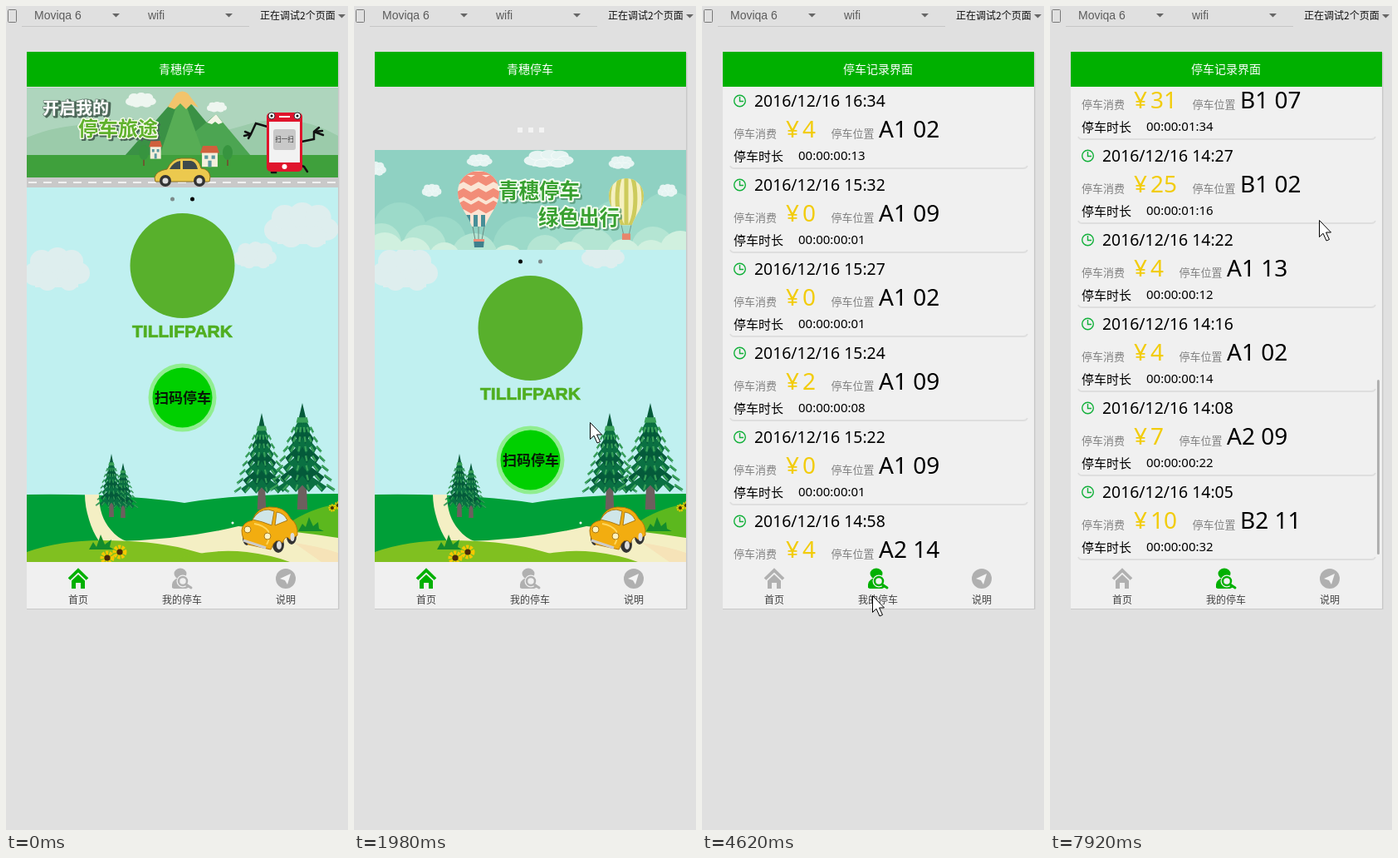
Animation of 412 by 990 pixels, one loop 8000 ms. Source, as an HTML page:

```html
<!DOCTYPE html>
<html lang="zh">
<head>
<meta charset="utf-8">
<title>停车</title>
<style>
html, body { margin: 0; width: 100%; height: 100%; overflow: hidden; background: #e0e0e0; }
svg { display: block; width: 412px; height: 990px; }
text { font-family: "Noto Sans CJK SC", "Noto Sans", sans-serif; }
.ui { font: 14px "Liberation Sans", Arial, sans-serif; fill: #5c5c5c; }
.num { font-family: "Noto Sans", "Open Sans", sans-serif; }
.mid { text-anchor: middle; }
.art { font-weight: 900; paint-order: stroke; stroke-linejoin: round; }
.first, .second, .tab1, .tab2, .dot1, .dot2, #strip, #pull, #list, #bar, #cursor {
  animation: 8s step-end infinite;
}
.first { animation-name: first; }
.second { animation-name: second; }
.tab1 { animation-name: leave; }
.tab2 { animation-name: enter; }
.dot1 { animation-name: light; }
.dot2 { animation-name: dim; }
#strip { animation-name: slide; }
#pull { animation-name: pull; }
#list { animation-name: scroll; }
#bar { animation-name: bar; }
#cursor { animation-name: cursor; }
@keyframes first { 0% { visibility: visible } 57.75%, 100% { visibility: hidden } }
@keyframes second { 0% { visibility: hidden } 57.75%, 100% { visibility: visible } }
@keyframes leave { 0% { color: #00b000 } 57.75%, 100% { color: #b0b0b0 } }
@keyframes enter { 0% { color: #b0b0b0 } 57.75%, 100% { color: #00b000 } }
@keyframes light { 0% { fill: #7d8b8b } 4.125%, 100% { fill: #000 } }
@keyframes dim { 0% { fill: #000 } 4.125%, 100% { fill: #7d8b8b } }
@keyframes slide {
  0% { transform: translate(-375px, 0) }
  4.125% { transform: translate(-160px, 0) }
  8.25%, 100% { transform: none }
}
@keyframes pull {
  0% { transform: none }
  16.5% { transform: translate(0, 17px) }
  20.625% { transform: translate(0, 100px) }
  24.75% { transform: translate(0, 75px) }
  28.875% { transform: translate(0, 50px) }
  33% { transform: translate(0, 28px) }
  37.125%, 100% { transform: none }
}
@keyframes scroll {
  0% { transform: none }
  78.375% { transform: translate(0, -263px) }
  82.5% { transform: translate(0, -527px) }
  86.625% { transform: translate(0, -790px) }
  94.875% { transform: translate(0, -880px) }
  99%, 100% { transform: translate(0, -944px) }
}
@keyframes bar {
  0% { transform: translate(40px, 0) }
  78.375% { transform: translate(0, 98px) }
  82.5% { transform: translate(0, 197px) }
  86.625% { transform: translate(0, 295px) }
  94.875% { transform: translate(0, 328px) }
  99%, 100% { transform: translate(0, 352px) }
}
@keyframes cursor {
  0% { transform: translate(-50px, 0) }
  12.375% { transform: translate(232px, 591px) }
  16.5% { transform: translate(243px, 362px) }
  20.625% { transform: translate(258px, 654px) }
  24.75% { transform: translate(284px, 500px) }
  28.875% { transform: translate(300px, 390px) }
  33% { transform: translate(309px, 312px) }
  37.125% { transform: translate(315px, 265px) }
  41.25% { transform: translate(240px, 463px) }
  45.375% { transform: translate(149px, 725px) }
  49.5% { transform: translate(193px, 711px) }
  53.625% { transform: translate(205px, 708px) }
  61.875% { transform: translate(210px, 701px) }
  66% { transform: translate(282px, 407px) }
  70.125% { transform: translate(322px, 246px) }
  74.25% { transform: translate(319px, 227px) }
  78.375% { transform: translate(320px, 234px) }
  82.5% { transform: translate(322px, 241px) }
  86.625% { transform: translate(323px, 248px) }
  94.875% { transform: translate(324px, 253px) }
  99%, 100% { transform: translate(324px, 257px) }
}
</style>
</head>
<body>
<svg viewBox="0 0 412 990">
  <defs>
    <clipPath id="view"><rect x="25" y="97" width="375" height="571"/></clipPath>
    <clipPath id="frame"><rect x="25" y="98" width="375" height="120"/></clipPath>
    <path id="envelope" d="M100 50a25 25 0 0 1 50 0c0 17-12 27-17 42h-16c-5-15-17-25-17-42z"/>
    <clipPath id="skin"><use href="#envelope"/></clipPath>
    <g id="cloud">
      <path d="M14 16h52v32h-52z"/>
      <circle cx="14" cy="32" r="14"/><circle cx="22" cy="17" r="14"/><circle cx="41" cy="14" r="14"/>
      <circle cx="58" cy="17" r="14"/><circle cx="67" cy="31" r="13"/><circle cx="55" cy="40" r="12"/>
      <circle cx="29" cy="40" r="12"/>
    </g>
    <g id="sunflower">
      <circle r="6" fill="none" stroke="#f5c800" stroke-width="5" stroke-dasharray="3 1.3"/>
      <circle r="3.6" fill="#4a2a08"/>
    </g>
    <g id="house">
      <path d="M1 7h18v17h-18z" fill="#f4efdc"/><path d="M-1 8l3-8h16l3 8z" fill="#d0603c"/>
      <path d="M4 11h4v4h-4zM12 11h4v4h-4zM8 17h4v7h-4z" fill="#5a9aa0"/>
    </g>
    <g id="bush">
      <path d="M-1 10h2v14h-2z" fill="#6a5a30"/><ellipse cy="8" rx="6" ry="9" fill="#37943f"/>
    </g>
  </defs>

  <!-- toolbar -->
  <rect x="2.5" y="4.5" width="10" height="15" rx="1" fill="none" stroke="#777"/>
  <path d="M19 24.5h274" stroke="#c6c6c6"/>
  <path d="M128 9h9l-4.500 4.500zM264 9h9l-4.500 4.500zM400 10h9l-4.500 4.500z" fill="#666"/>
  <text class="ui" x="34" y="16">Moviqa 6</text>
  <text class="ui" x="171" y="16">wifi</text>
  <text x="306" y="16" font-size="12" fill="#111">正在调试2个页面</text>

  <rect x="25" y="56" width="376.500" height="669" fill="#c9c9c9"/>
  <rect x="25" y="55" width="375" height="669" fill="#f0f0f0"/>

  <!-- home page -->
  <g class="first" clip-path="url(#view)">
    <path d="M25 97h375v571h-375z" fill="#c0f0f0"/>
    <g fill="#deeeee">
      <use href="#cloud" transform="translate(21 290)"/>
      <use href="#cloud" transform="translate(311 236) scale(1.120 1.040)"/>
      <use href="#cloud" transform="translate(274 283) scale(.65 .62)"/>
    </g>
    <path d="M25 587q70-1 125 3 40 3 65 7 60-11 185-11v82h-375z" fill="#009f38"/>
    <path d="M340 622q25-18 60-24v60h-70z" fill="#5cb81e"/>
    <path d="M95 587h17q0 26 14 42 8 10 19 14h-33q-8-12-12-26-5-16-5-30z" fill="#f4efc4"/>
    <path d="M135 643q80-2 145-18 62 5 120 14v29h-190q-30-19-75-25z" fill="#f4efc4"/>
    <path d="M25 656q40-14 90-14 60 0 100 10 25 6 50 16h-240z" fill="#80c020"/>
    <path d="M195 668q45-17 95-12 32 4 52 12z" fill="#80c020"/>
    <path d="M347 645q30 4 53 12v11h-20z" fill="#f6e3b8"/>
    <path d="M100 653l5-9 4 6 5-15 5 12 8-6-2 9 5 3zM352 631l5-9 4 4 4-12 5 11 6-5 1 8 6 3z" fill="#138c2c"/>
    <g id="forest"></g>
    <use href="#sunflower" x="137" y="656"/><use href="#sunflower" x="122" y="663"/>
    <use href="#sunflower" transform="translate(393 603) scale(.55)"/>
    <use href="#sunflower" transform="translate(400 600) scale(.55)"/>
    <!-- car -->
    <g>
      <ellipse cx="290" cy="638" rx="5" ry="10" fill="#333"/><ellipse cx="328" cy="647" rx="7" ry="10" fill="#333"/>
      <ellipse cx="344" cy="637" rx="6" ry="10" fill="#333"/>
      <path d="M284 630q1-10 13-12 5-15 20-16 19-1 26 14 9 6 8 20l-9 5q-5-7-9 4-8-9-14 8l-27-6q-8-6-8-17z" fill="#f2ad10" stroke="#b87808"/>
      <path d="M297 617q7-12 19-12l7 2-3 17q-12-5-23-7z" fill="#cfe6e8" stroke="#a87a18"/>
      <path d="M326 608q9 1 13 10l-15 6z" fill="#dceeee" stroke="#a87a18"/>
      <path d="M299 622q12 2 17 9 2 10-2 16" fill="none" stroke="#ffd65c" stroke-width="2"/>
      <circle cx="291" cy="629" r="4" fill="#fff3c0" stroke="#a87a18"/><circle cx="315" cy="637" r="4" fill="#fff3c0" stroke="#a87a18"/>
      <path d="M286 642l27 9" stroke="#ccc" stroke-width="3"/>
      <ellipse cx="329" cy="648" rx="3" ry="5" fill="#ddd"/><ellipse cx="345" cy="638" rx="2.500" ry="5" fill="#ddd"/>
      <circle cx="273" cy="621" r="1.500" fill="#fff"/>
    </g>

    <g id="pull">
      <path d="M25-30h375v128h-375z" fill="#e0e0e0"/>
      <path d="M197 71h6v6h-6zM210 71h6v6h-6zM223 71h6v6h-6z" fill="#f3f3f3"/>
      <g clip-path="url(#frame)"><g id="strip">
        <!-- balloons -->
        <g transform="translate(25 98)">
          <path d="M0 0h375v120h-375z" fill="#8fd1c2"/>
          <g fill="#9cdac9">
            <circle cx="30" cy="95" r="32"/><circle cx="80" cy="110" r="30"/><circle cx="180" cy="118" r="38"/>
            <circle cx="240" cy="110" r="30"/><circle cx="292" cy="96" r="36"/><circle cx="355" cy="92" r="42"/>
          </g>
          <g fill="#b4e5d3">
            <circle cx="8" cy="112" r="24"/><circle cx="60" cy="116" r="26"/><circle cx="120" cy="128" r="28"/>
            <circle cx="205" cy="124" r="22"/><circle cx="262" cy="122" r="28"/><circle cx="335" cy="118" r="26"/>
          </g>
          <g fill="#d0f0df">
            <circle cx="12" cy="122" r="23"/><circle cx="46" cy="127" r="22"/><circle cx="84" cy="130" r="19"/>
            <circle cx="160" cy="134" r="20"/><circle cx="235" cy="130" r="20"/><circle cx="300" cy="128" r="21"/>
            <circle cx="333" cy="128" r="20"/><circle cx="368" cy="122" r="25"/>
          </g>
          <g fill="#e6f4f2" stroke="#fff" stroke-width="1">
            <use href="#cloud" transform="translate(111 5) scale(.38 .28)"/>
            <use href="#cloud" transform="translate(57 41) scale(.29)"/>
            <use href="#cloud" transform="translate(180 0) scale(.74 .4)"/>
            <use href="#cloud" transform="translate(282 7) scale(.38 .3)"/>
            <use href="#cloud" transform="translate(341 41) scale(.29)"/>
            <use href="#cloud" transform="translate(-12 14) scale(.32)"/>
          </g>
          <use href="#envelope" fill="#fbe5d4"/>
          <g clip-path="url(#skin)">
            <path d="M98 38l9-5 9 5 9-5 9 5 9-5 9 5M98 56l9-5 9 5 9-5 9 5 9-5 9 5M98 71l9-5 9 5 9-5 9 5 9-5 9 5" fill="none" stroke="#f28d78" stroke-width="9"/>
            <path d="M98 26h54v4h-54z" fill="#f28d78"/>
            <path d="M110 78h5v16h-5zM119 78h5v16h-5zM128 78h5v16h-5z" fill="#478f98"/>
          </g>
          <path d="M118 92l3 16M125 92v16M132 92l-3 16" stroke="#6a8a80"/>
          <path d="M119 107h13l-1 10h-11z" fill="#3f7f8c"/><path d="M119 107h13v3h-13z" fill="#f28d78"/>
          <g transform="translate(198 13) scale(.84)">
            <use href="#envelope" fill="#f5f0c0"/>
            <g clip-path="url(#skin)" fill="none" stroke="#cdcb5c" stroke-width="6">
              <path d="M125 22v72"/><ellipse cx="125" cy="54" rx="13" ry="42"/><ellipse cx="125" cy="54" rx="25" ry="44"/>
            </g>
            <path d="M118 92l3 13M132 92l-3 13" stroke="#6a8a80"/><path d="M119 104h12v9h-12z" fill="#e8866c"/>
          </g>
          <g class="art" font-size="24.500">
            <g fill="#4d8f6b" stroke="#4d8f6b" stroke-width="4" opacity=".7"><text x="151" y="60">青穗停车</text><text x="199" y="92">绿色出行</text></g>
            <g fill="#38a030" stroke="#f4fff0" stroke-width="4"><text x="149" y="58">青穗停车</text><text x="197" y="90">绿色出行</text></g>
          </g>
        </g>
        <!-- road trip -->
        <g transform="translate(400 98)">
          <path d="M0 0h375v120h-375z" fill="#aed5bd"/>
          <path d="M0 60q60-25 130-10t130-4 115 12v30h-375z" fill="#9bcbaa"/>
          <path d="M118 82l68-77 64 77z" fill="#3a9145"/><path d="M168 82l60-50 42 50z" fill="#4ca552"/>
          <path d="M160 82l26-77 28 77z" fill="#57ad55"/>
          <path d="M170 23l10-16q8-5 14 0l13 17-9-4-6 6-7-7-7 7z" fill="#f2c46c"/>
          <path d="M217 42l11-10 8 10-5 2-4-3-4 3z" fill="#f5f5e8"/>
          <g fill="#eef6f0"><use href="#cloud" transform="translate(119 6) scale(.46 .34)"/><use href="#cloud" transform="translate(217 17) scale(.3 .24)"/></g>
          <path d="M0 81h375v28h-375z" fill="#3fa03c"/>
          <use href="#house" transform="translate(148 64) scale(.72 .9)"/><use href="#house" transform="translate(210 70) scale(1.050)"/>
          <use href="#bush" x="141" y="70"/><use href="#bush" x="242" y="70"/>
          <path d="M0 108h375v12h-375z" fill="#c9c9c9"/>
          <path d="M2 114h371" stroke="#fff" stroke-width="1.500" stroke-dasharray="10 8"/>
          <!-- small car -->
          <path d="M154 108q2-8 15-10 6-13 17-13h12q9 0 12 12 10 1 11 10l-1 6h-65z" fill="#ecc94e" stroke="#8a7020"/>
          <path d="M172 98q5-9 13-10v10zM188 88h10q6 1 8 10h-18z" fill="#3d4a4c"/>
          <circle cx="167" cy="112" r="7" fill="#333"/><circle cx="208" cy="112" r="7" fill="#333"/>
          <circle cx="167" cy="112" r="3.500" fill="#ddd"/><circle cx="208" cy="112" r="3.500" fill="#ddd"/>
          <!-- phone mascot -->
          <g fill="none" stroke="#111" stroke-width="2.500" stroke-linecap="round">
            <path d="M290 47l-14-4-6 13M270 56l-7-3M270 56l-8 2M270 56l-3 5M331 65l15-3v-9M346 53l10-1M346 53l11 4M346 53l6-5M300 92v10h-5M322 90l12 5 4 6"/>
          </g>
          <rect x="289" y="30" width="43" height="71" rx="5" fill="#e0142c"/>
          <rect x="292" y="41" width="37" height="49" fill="#f2f2f2"/><rect x="297" y="50" width="27" height="25" rx="3" fill="#c8c8c8"/>
          <text class="mid" x="310.500" y="65" font-size="7.500" fill="#333">扫一扫</text>
          <g fill="#fff" stroke="#333"><circle cx="295" cy="34" r="4"/><circle cx="326" cy="34" r="4"/></g>
          <circle cx="295" cy="34" r="1.500"/><circle cx="326" cy="34" r="1.500"/>
          <path d="M304 35h13" stroke="#fff" stroke-width="2"/><circle cx="310.500" cy="95" r="3" fill="#fff"/>
          <g class="art">
            <g fill="#4a6657" stroke="#4a6657" stroke-width="3"><text x="21" y="33" font-size="20">开启我的</text><text x="64" y="60" font-size="24">停车旅途</text></g>
            <text x="19" y="32" font-size="20" fill="#fff" stroke="#71877b" stroke-width="1.500">开启我的</text>
            <text x="62" y="58" font-size="24" fill="#5fb12c" stroke="#f5fbe8" stroke-width="3">停车旅途</text>
          </g>
        </g>
      </g></g>
      <circle class="dot1" cx="200.500" cy="232" r="2.500"/><circle class="dot2" cx="224.500" cy="232" r="2.500"/>
      <circle cx="212.500" cy="312" r="63" fill="#58b02c"/>
      <text class="mid" x="212.500" y="398" fill="#4fae20" stroke="#4fae20" stroke-width=".7" style="font:bold 21px 'Liberation Sans',Arial,sans-serif">TILLIFPARK</text>
      <circle cx="212.500" cy="470.500" r="41" fill="#90ee90"/><circle cx="212.500" cy="470.500" r="36" fill="#00d000"/>
      <text class="mid" x="213" y="476.500" font-size="17" font-weight="700" fill="#061806">扫码停车</text>
    </g>
  </g>

  <!-- parking records -->
  <g class="second" clip-path="url(#view)">
    <g id="list"></g>
    <rect id="bar" x="394" y="97" width="3" height="210" rx="1.500" fill="#b0b0b0"/>
  </g>

  <path d="M25 55h375v42h-375z" fill="#00b000"/>
  <g class="mid" font-size="14" fill="#fff">
    <text class="first" x="212" y="81">青穗停车</text>
    <text class="second" x="212" y="81">停车记录界面</text>
  </g>

  <!-- tabs -->
  <path d="M25 668h375v56h-375z" fill="#f0f0f0"/>
  <g class="tab1" fill="currentColor">
    <path d="M76 688.500l11-10.500 11 10.500" fill="none" stroke="currentColor" stroke-width="3.800"/>
    <path d="M79 690.500l8-7.500 8 7.500v9.500h-5v-7h-6v7h-5z"/>
  </g>
  <g class="tab2" fill="currentColor">
    <ellipse cx="210" cy="682" rx="7.500" ry="6.500"/><path d="M200 699q-1-9 7-12h8l6 11-4 2h-15z"/>
    <circle cx="213" cy="691" r="5" fill="#f0f0f0" stroke="#f0f0f0" stroke-width="5"/>
    <circle cx="213" cy="691" r="5" fill="none" stroke="currentColor" stroke-width="2.500"/>
    <path d="M217 695l6 4" stroke="currentColor" stroke-width="3" stroke-linecap="round"/>
  </g>
  <circle cx="337" cy="688" r="12" fill="#b0b0b0"/><path d="M330 688l13-6-4 13-3-5z" fill="#f4f4f4"/>
  <g class="mid" font-size="12" fill="#444">
    <text x="87" y="718">首页</text><text x="212" y="718">我的停车</text><text x="337" y="718">说明</text>
  </g>

  <path id="cursor" d="M.5.5v20l4.500-4.300 4 8.800 3.500-1.500-4-8.500h6z" fill="#fff" stroke="#000"/>
</svg>
<script>
const $ = id => document.getElementById(id);

// time, fee, place, minutes:seconds
const records = `16:34 4 A1 02 00:13|15:32 0 A1 09 00:01|15:27 0 A1 02 00:01|15:24 2 A1 09 00:08
15:22 0 A1 09 00:01|14:58 4 A2 14 00:13|14:52 5 A2 03 00:15|14:46 6 A1 07 00:19
14:41 10 C2 14 00:31|14:35 31 B1 07 01:34|14:27 25 B1 02 01:16|14:22 4 A1 13 00:12
14:16 4 A1 02 00:14|14:08 7 A2 09 00:22|14:05 10 B2 11 00:32`.split(/[|\n]/);

$('list').innerHTML = records.map((line, i) => {
  const [time, fee, zone, slot, spent] = line.split(' ');
  const shift = 16 * (fee.length - 1);
  return `<g transform="translate(0 ${97 + 101 * i})">
    <g fill="none" stroke="#12b03a" stroke-width="1.4"><circle cx="45.5" cy="17" r="6.8"/><path d="M45.500 12v5.500h4.500"/></g>
    <text class="num" x="63" y="24" font-size="19.4">2016/12/16 ${time}</text>
    <g font-size="13" fill="#808080"><text x="38" y="61">停车消费</text><text x="${155.5 + shift}" y="61">停车位置</text></g>
    <g font-size="28"><text class="num" x="101" y="61" fill="#f2cc0c">¥</text>
      <text class="num" x="121" y="61" fill="#f2cc0c">${fee}</text>
      <text class="num" x="${213 + shift}" y="61">${zone} ${slot}</text></g>
    <text x="38" y="88.5" font-size="15">停车时长</text>
    <text class="num" x="116" y="88" font-size="15">00:00:${spent}</text>
    <path d="M34 95q1 3 5 3h348q4 0 5-3" fill="none" stroke="#dedede" stroke-width="1.8"/>
  </g>`;
}).join('');

// conifer with ragged, drooping tiers, tip at (x, y)
function tree(x, y, w, h) {
  const tiers = 8;
  let out = `<path d="M${x - w * .05} ${y + h * .6}h${w * .1}l${w * .03} ${h * .4}h${-w * .16}z" fill="#6d5f5e"/>`;
  for (let i = tiers - 1; i >= 0; i--) {
    const top = y + h * .09 * i, low = top + h * .19;
    const half = w * (.08 + .42 * (i / (tiers - 1)) ** .8);
    let edge = `M${x} ${top}`, shine = '';
    for (let j = -5; j <= 5; j++) {
      const px = x + half * j / 5;
      const py = low + (j & 1 ? h * .015 : -h * .05);
      edge += `L${px} ${py}`;
      if (j & 1) shine += `M${px} ${py - h * .02}L${px - half * j * .05} ${py - h * .07}`;
    }
    out += `<path d="${edge}z" fill="${i & 1 ? '#0a7042' : '#045a3a'}"/>
      <path d="${shine}" stroke="#38a058" stroke-width="${w * .03}"/>`;
  }
  return out;
}
$('forest').innerHTML = tree(141, 549, 36, 66) + tree(127, 538, 38, 76)
  + tree(308, 489, 66, 116) + tree(357, 477, 78, 128);
</script>
</body>
</html>
```
